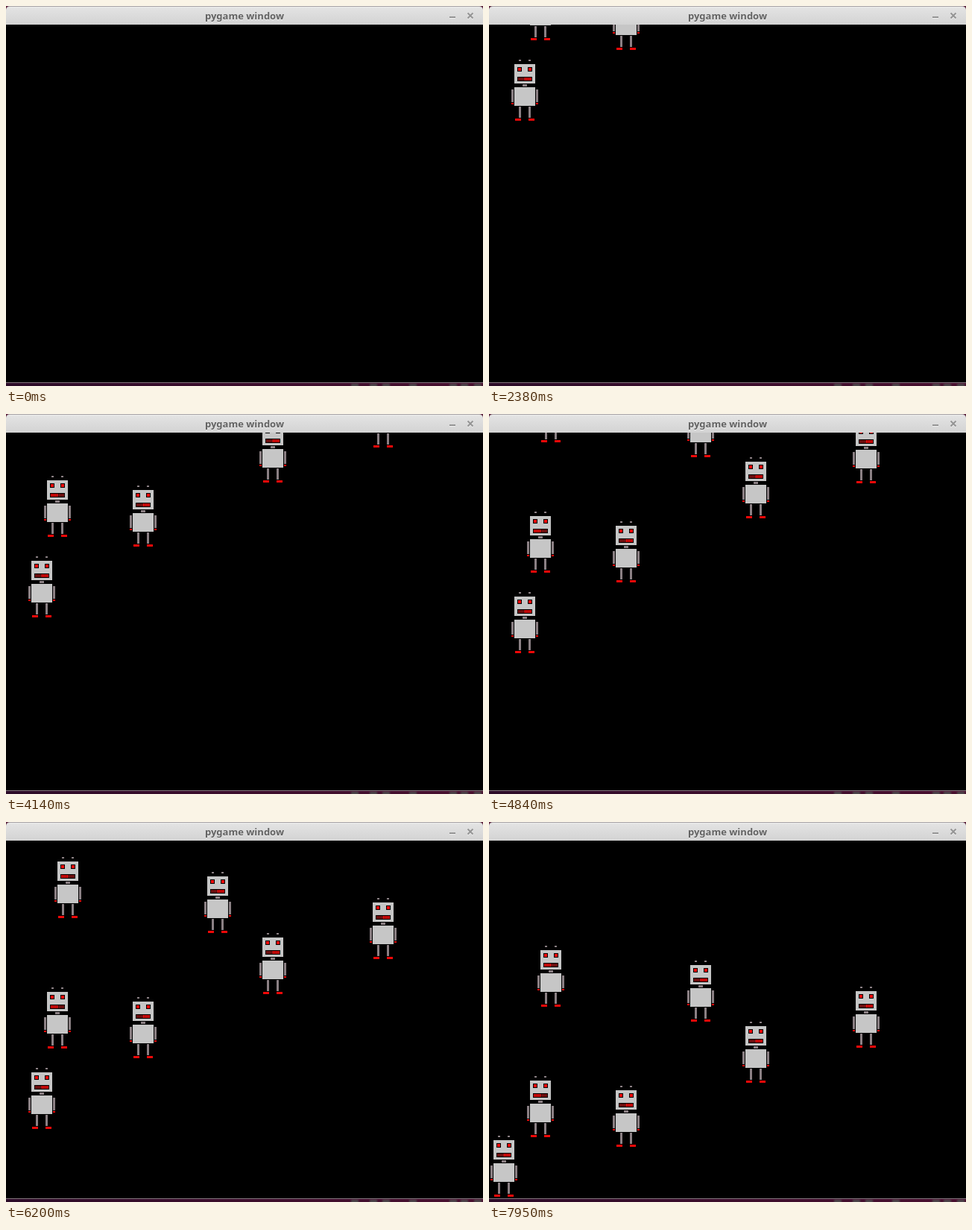
These frames come from a looping animation (640 by 510 pixels, 7.99 s). An HTML page with a canvas:

```html
<!DOCTYPE html>
<html lang="en">
<head>
<meta charset="utf-8">
<title>pygame window</title>
<style>
html, body { margin: 0; width: 100%; height: 100%; overflow: hidden; background: #000; }
#win { position: relative; width: 640px; height: 510px; overflow: hidden; background: #000; }
canvas { position: absolute; left: 0; top: 25px; display: block; }
#bar { position: absolute; left: 0; top: 0; width: 640px; height: 25px; background: #5a1a38; }
#face {
  position: absolute; inset: 0; box-sizing: border-box; border-top: 1px solid #a9a4a6;
  border-radius: 5px 5px 0 0; background: linear-gradient(#ebebeb, #e2e2e2 10%, #d3d3d3);
  font: bold 13px/25px "Noto Sans", "Open Sans", sans-serif; text-align: center;
  color: #626262; text-shadow: 0 1px 0 #efefef;
}
#bar svg { position: absolute; left: 0; top: 0; }
#desk {
  position: absolute; left: 0; top: 505px; width: 640px; height: 5px; box-sizing: border-box;
  border-top: 1px solid #84747e; overflow: hidden;
  background: linear-gradient(90deg, #2c0b28, #3a0d2c 40%, #4a1030);
}
#desk i { position: absolute; top: 1px; width: 10px; height: 4px; background: #4d4a4c; filter: blur(1px); }
</style>
</head>
<body>
<div id="win">
  <canvas id="stage" width="640" height="480"></canvas>
  <div id="bar">
    <div id="face">pygame window</div>
    <svg width="640" height="25" fill="none" stroke-width="2">
      <path d="M595 16h8M619.5 10.5l7 7m0-7l-7 7" stroke="#f0f0f0"/>
      <path d="M595 15h8M619.5 9.5l7 7m0-7l-7 7" stroke="#949494"/>
    </svg>
  </div>
  <div id="desk"></div>
</div>
<script>
const LOOP = 7990, ENTER = 500, TICK = 46.273, SPEED = 3.14;
const TOP = 25, HEIGHT = 82, FLOOR = 503;
const GREY = '#8b8084', PLATE = '#c6c6c6', RED = '#f00808';

// x and vertical offset from the lead robot
const ROBOTS = [[30, 0], [51, -108], [166, -95], [340, -181], [488, -228], [266, -263], [65, -283]];

const desk = document.getElementById('desk');
for (const x of [463, 488, 505, 541, 595, 610, 628]) {
  const mark = document.createElement('i');
  mark.style.left = x + 'px';
  desk.append(mark);
}

const ctx = document.getElementById('stage').getContext('2d');

function box(color, x, y, w, h) {
  ctx.fillStyle = color;
  ctx.fillRect(x, y, w, h);
}

// the brighter half depends on whether x is even or odd
function mouth(odd) {
  box('#000', 8, 23, 20, 6);
  for (let half = 0; half < 2; half++) {
    const bright = (half === 0) === odd, x = 9 + half * 9;
    box(bright ? '#900404' : '#4a0808', x, 24, 9, 4);
    for (let i = 0; i < 9; i += 2) box(bright ? RED : '#8c1414', x + i, 24, 1, 4);
  }
}

function robot(x, y) {
  ctx.save();
  ctx.translate(x, y - TOP);
  box(PLATE, 4, 6, 28, 26);
  box(PLATE, 4, 37, 28, 25);
  box(GREY, 15, 33, 6, 3);
  for (const side of [0, 1]) {
    const leg = 10 + side * 13, eye = 8 + side * 14, arm = side * 33;
    box(GREY, leg, 0, 3, 2);
    box('#000', eye, 10, 6, 6);
    box(RED, eye + 1, 11, 4, 4);
    box(GREY, arm, 40, 3, 17);
    box(RED, arm, 58, 3, 2);
    box(GREY, leg, 63, 3, 15);
    box(RED, 5 + side * 18, 79, 8, 3);
  }
  mouth(x % 2 === 1);
  ctx.restore();
}

function draw(time) {
  box('#000', 0, 0, 640, 480);
  const tick = Math.round((time - ENTER) / TICK);
  const lead = Math.floor(TOP + 0.85 + SPEED * tick);
  for (const [x, dy] of ROBOTS) {
    const y = lead + dy;
    // on the floor, further travel goes to the left
    const slide = Math.max(0, y - FLOOR);
    robot(x - slide, y - slide - HEIGHT);
  }
}

const start = performance.now();
function loop() {
  draw((performance.now() - start) % LOOP);
  requestAnimationFrame(loop);
}
loop();
</script>
</body>
</html>
```
